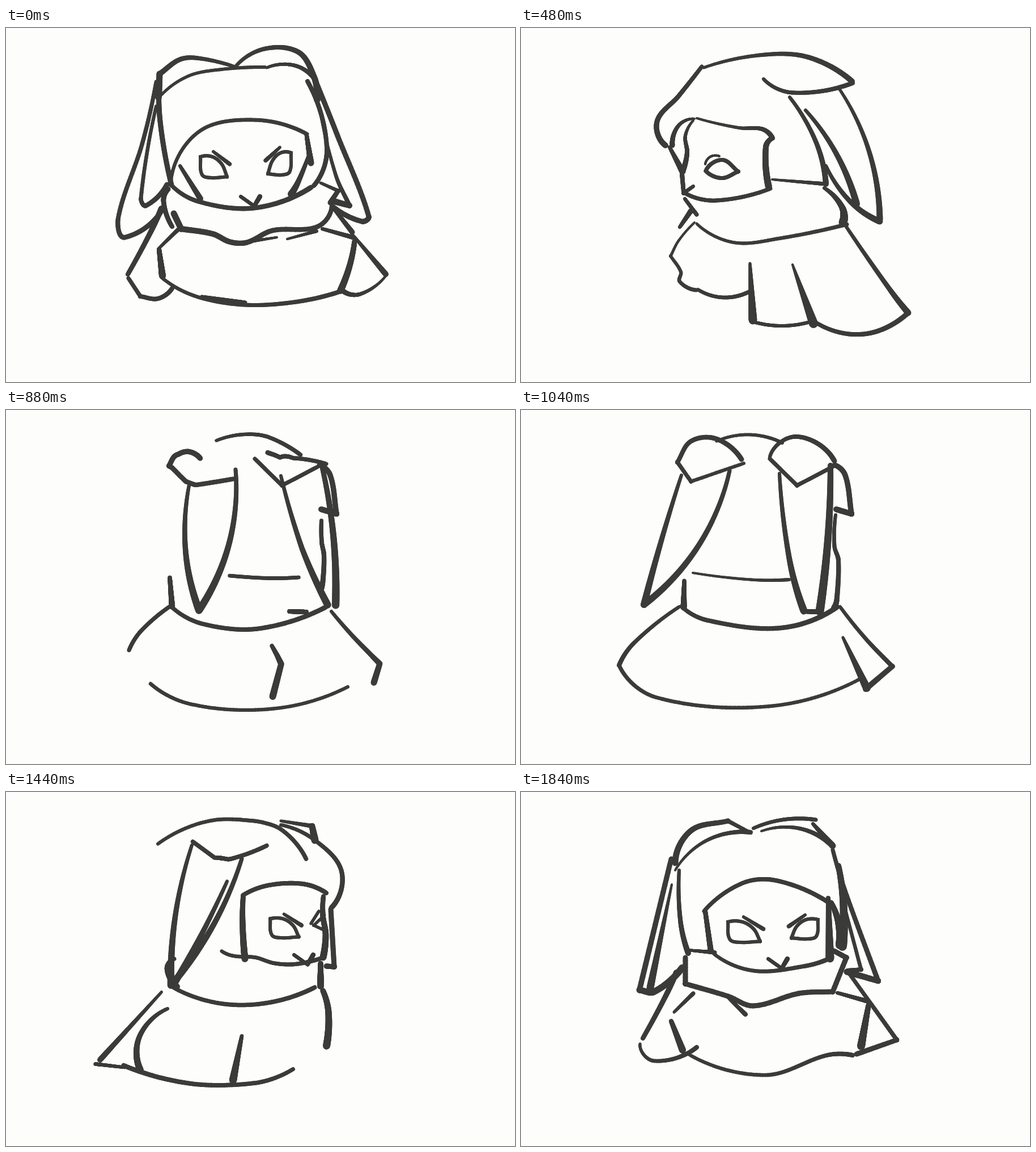
Write an HTML page with a canvas that moves like this. It is 898 px wide and 624 px high and loops after 1920 ms.

```html
<!DOCTYPE html>
<html lang="en">
<head>
<meta charset="utf-8">
<title>Hooded rabbit turnaround</title>
<style>
html, body { margin: 0; width: 100%; height: 100%; overflow: hidden; background: #fdfdfc; }
canvas { display: block; }
</style>
</head>
<body>
<canvas id="stage" width="898" height="624"></canvas>
<script>
// A stroke reads "startWidth>endWidth x,y x,y ...": a smooth line whose pressure changes evenly.
// "!" marks a corner, "~n" bows the line by n pixels between its neighbours.
// Ears and eyes: a = the rabbit's left, b = its right. Equal names move into each other.
const STEP = 80, COUNT = 24, SAMPLES = 80;

function ear(side, base, otherBase, tip, bow, otherBow, weight = 12) {
  return {
    [side + 1]: `6>${weight} ${base} ~${bow} ${tip}`,
    [side + 2]: `7>${weight} ${otherBase} ~${otherBow} ${tip}`
  };
}

// A slanted eye with its lid, given by its outer and inner side.
function eye(side, outer, inner, top, bottom) {
  const at = (u, v) => `${outer + (inner - outer) * u},${top + (bottom - top) * v}`;
  return {
    ["eye" + side]: `6>6 ${at(0, 0)}! ${at(0.06, 0.85)} ${at(0.4, 1)} ${at(1, 0.95)}! ${at(0.8, 0.35)} ${at(0.45, 0)} ${at(0, 0)}`,
    ["lid" + side]: `5>7 ${at(0.48, -0.25)} ${at(1.1, 0.35)}`
  };
}

function mouth(x, y) {
  return {
    mouthL: `6>6 ${x - 24},${y - 17} ${x},${y}`,
    mouthR: `8>7 ${x + 10},${y - 17} ${x},${y}`
  };
}

const front = {
  ...eye("B", 343, 390, 227, 264),
  ...eye("A", 503, 462, 220, 259),
  ...mouth(438, 314),
  topB: "12>6 269,122 271,81! 308,55 345,54 408,70",
  browB: "5>6 274,118 ~12 380,73 457,69",
  top: "6>12 405,68 455,37 515,42 543,85 549,126",
  browA: "5>8 460,70 509,66 545,91",
  b1: "7>9 265,95 240,205 198,335 210,369 278,316",
  b2: "6>9 265,138 238,300 247,313 284,276",
  headL: "9>9 271,90 272,165 292,277",
  a2: "9>9 549,100 585,190 640,332 628,341 578,316",
  a1: "5>11 555,150 582,260 606,313! 577,305",
  headR: "8>8 532,94 566,210 543,278",
  face: "6>7 291,270 340,183 438,162 531,187",
  faceR: "7>11 530,187 538,238",
  flapR: "6>12 535,222 516,270 503,293",
  faceL: "6>10 307,243 343,301",
  jaw: "7>9 290,275 340,306 440,317 538,281",
  scarfL: "9>8 286,284 278,306 293,350",
  scarf: "11>8 296,327 309,354! 365,363 395,377 425,378 470,357 550,350 575,312",
  crease: "6>4 420,378 478,369",
  crease2: "4>6 496,372 548,358",
  scarfR: "5>9 555,273 586,287! 572,308",
  scarfR2: "6>9 578,318 611,360",
  chestL: "7>5 304,355 270,388",
  sideL: "8>12 270,390 276,437",
  hem: "6>8 276,441 335,473 420,488 510,483 588,465",
  hemL: "5>7 345,473 422,484",
  shoulderR: "6>8 558,354 612,369",
  sideR: "9>12 615,376 606,420 590,463",
  cape: "10>8 274,318 255,360 215,434",
  cuffL: "7>8 216,441 237,473! 268,477 293,459",
  back: "5>10 612,365 670,434",
  cuffR: "4>9 670,437 625,469 594,463"
};

const left = {
  ...ear("a", "502,145", "560,105", "592,310", 11, 0),
  a2: "5>11 560,105 ~18 633,338",
  top: "5>10 322,70 420,48 505,51 584,94",
  hood: "7>10 319,68 278,120 240,165 255,207",
  hood2: "6>11 262,210 285,253",
  flap: "9>4 267,207 278,172 306,160",
  faceL: "4>10 304,163 290,190 293,220 285,253",
  face: "4>9 310,159 385,176 425,178 443,193",
  faceR: "8>12 444,194 432,210 437,280",
  nose: "8>6 284,257 287,291! 304,279",
  jaw: "7>7 291,292 345,304 440,283",
  neck: "4>7 443,267 538,275",
  eyeA: "7>7 326,252 ~20 383,253! ~12 326,252",
  lidA: "4>4 325,240 ~7 350,226",
  foldA: "6>8 428,90 480,114 585,97",
  earEdge: "11>6 633,341 580,305 538,243",
  headR: "6>10 474,122 520,200 538,275",
  scarfR: "6>15 535,282 566,315 568,343",
  scarfL: "6>7 289,301 310,329",
  scarfL2: "9>6 300,322 280,351",
  scarf: "5>7 310,345 375,378 455,371 575,346",
  chestL: "4>7 306,343 278,375 264,402! 282,430 280,447 309,462",
  hemL: "6>7 312,461 ~-12 402,465",
  p1: "5>15 404,415 409,515",
  p2: "4>16 479,417 516,521",
  cuffL: "6>6 410,518 ~-7 510,518",
  hem: "7>9 520,519 575,539 630,534 683,502",
  back: "6>11 573,349 650,460 683,502"
};

const leftBack = {
  ...ear("a", "365,140", "442,103", "464,363", -32, 21, 14),
  ...ear("b", "514,120", "570,105", "636,333", -4, 11),
  topB: "7>6 298,80 325,65 403,54",
  top: "6>9 397,53 450,42 500,49 578,100",
  foldA: "10>10 296,83 299,105! 340,128 409,149",
  foldA2: "14>5 409,149 440,100 462,88",
  knot: "9>8 469,80 473,75",
  foldB: "10>5 484,67 500,116! 577,100",
  hood: "7>12 292,95 ~-8 268,203",
  face: "6>14 287,175 320,160 350,195 348,297",
  jaw: "7>8 352,299 300,295 277,248! 285,180",
  eyeA: "9>9 295,231 294,248",
  tuft: "5>14 525,120 575,200 620,305",
  neckL: "5>7 355,304 390,310",
  neck: "9>7 486,297 560,291",
  headR: "8>9 558,205 ~4 558,290",
  scarfR: "8>11 561,290 569,346",
  scarfL: "8>10 290,290 299,345",
  scarf: "7>8 298,345 360,382 430,387 570,348",
  cape: "8>6 297,347 ~-4 261,397",
  chestL: "9>9 260,400 275,465",
  p1: "8>6 273,480 326,402",
  p2: "9>10 370,430 375,435! 331,520",
  cuffL: "4>7 267,489 325,512",
  hem: "6>6 337,515 475,534 606,503",
  cuffR: "5>7 588,519 ~-10 673,463",
  back: "6>12 585,363 690,469"
};

const rear = {
  ...ear("a", "283,115", "368,107", "217,343", -2, 25),
  b1: "6>13 456,112 473,260 499,354",
  b2: "10>15 546,98 ~5 527,355",
  tip: "8>8 500,355 530,356",
  top: "5>6 345,55 ~13 461,58",
  foldA: "9>6 389,87 345,51 300,55 276,92! 300,126! 393,94",
  foldB: "6>9 439,83 487,47 553,90",
  foldB2: "7>7 439,86 487,133! 550,100",
  flap: "9>10 553,97 572,115 583,183! 556,175",
  headR: "6>10 555,185 553,240 560,265 557,335 552,349",
  neck: "4>6 303,287 405,299 473,299",
  scarfL: "7>11 288,301 287,348",
  scarf: "7>9 283,346 330,371 460,384 558,347",
  cape: "6>8 279,347 200,410 173,450",
  hem: "7>6 173,450 240,507 440,522 600,473",
  back: "6>10 563,347 608,403 655,452! 608,492",
  p2: "5>14 568,401 610,490"
};

const rightBack = {
  ...ear("a", "264,98", "312,107", "224,316", -7, 24),
  ...ear("b", "380,85", "460,130", "358,347", -20, 17),
  ...eye("B", 498, 546, 227, 254),
  top: "6>9 263,86 365,48 480,55 550,85 574,185",
  flap: "9>7 574,182 586,187! 572,203",
  foldA: "6>6 263,93 300,100 385,77",
  foldA2: "4>5 298,104 384,81",
  foldB: "9>6 386,78 391,128! 430,132 527,101",
  tuftA: "5>10 300,140 228,305",
  tuft: "6>7 452,135 ~6 362,343",
  headL: "10>8 268,260 270,338",
  face: "8>9 455,181 520,162 575,185",
  faceL: "9>11 456,183 464,290",
  faceR: "8>10 563,193 558,220 565,250 553,291",
  jaw: "6>7 464,293 553,291",
  chin: "6>10 553,291 557,308 537,338",
  scarf: "6>9 280,343 420,377 537,339",
  shoulderR: "4>7 546,339 570,348",
  sideR: "11>14 567,350 575,437",
  cuffR: "7>9 571,441 547,487",
  p1: "6>15 465,430 459,518",
  p2: "5>12 508,408 537,492",
  cape: "4>9 268,353 155,481",
  cuffL: "7>5 155,482 185,483",
  hem: "10>7 172,465 290,523 410,532 460,519",
  hem2: "6>8 468,516 ~-7 537,490"
};

const right = {
  ...ear("b", "276,102", "372,105", "224,334", -1, 10, 13),
  ...eye("B", 434, 487, 220, 260),
  ...mouth(532, 304),
  eyeA: "5>5 562,217 543,235! 560,243",
  lidA: "5>5 552,210 538,232",
  top: "6>6 273,97 340,52 390,42 485,51",
  fin: "5>13 485,51 540,60! 545,85",
  hood: "6>9 485,58 545,85 592,140 574,204",
  foldB: "6>9 273,97 368,105! 393,88",
  tuft: "6>17 328,180 283,250 232,332",
  face: "7>7 381,183 430,165 510,159 555,171",
  faceL: "8>13 381,183 375,230 379,298",
  faceR: "8>14 557,175 566,292",
  flapR: "9>9 573,207 579,308! 565,307",
  jaw: "6>8 297,268 320,285 380,291 430,312 490,315 567,292",
  scarfL: "7>10 297,294 284,312 302,343",
  scarf: "8>7 310,346 410,374 552,350",
  scarfR: "9>12 555,302 555,342",
  sideR: "8>12 551,350 567,385 556,458",
  cape: "6>11 281,352 177,463",
  cuffL: "6>6 160,477 235,488",
  sideL: "6>12 285,382 236,430 237,490",
  p1: "7>12 367,430 342,498",
  hem: "7>7 243,499 440,501 553,458"
};

const { cape, chestL, shoulderR } = front;
const almostFront = {
  cape, chestL, shoulderR,
  ...eye("B", 365, 422, 229, 265),
  ...eye("A", 524, 477, 225, 259),
  ...mouth(460, 311),
  topB: "11>6 272,125 300,68 365,51! 405,72",
  browB: "4>8 272,138 ~22 405,71",
  top: "6>7 410,64 ~8 520,49",
  browA: "4>9 424,69 490,64 547,93",
  foldA: "6>11 515,56 550,95",
  b1: "9>12 265,118 209,349! 235,352 284,310",
  b2: "4>13 266,163 228,345",
  headL: "6>10 279,138 281,225 295,284",
  a2: "7>11 550,102 572,175 630,333! 575,317",
  a1: "6>8 570,200 600,313! 576,315",
  headR: "10>16 560,130 569,200 567,272",
  flapR: "9>14 547,195 560,230 562,270",
  face: "7>8 323,210 390,161 450,156 540,193",
  faceL: "8>10 325,210 335,281",
  faceR: "8>15 542,187 545,293",
  collar: "5>7 298,279 342,283",
  jaw: "6>8 340,285 410,315 500,307 545,293",
  scarf: "9>9 290,292 290,338! 365,360 410,377 490,355 550,352! 574,292! 552,280",
  crease: "5>8 365,362 396,392",
  sideL: "8>12 265,404 285,455",
  cuffL: "5>8 210,444 235,474 310,450",
  hem: "6>8 297,463 430,499 540,464 585,464",
  sideR: "9>14 613,376 600,448",
  back: "7>9 577,317 663,437! 592,462"
};

const mix = (a, b, t) => a + (b - a) * t;

function unit(p, q) {
  const dx = q[0] - p[0], dy = q[1] - p[1], d = Math.hypot(dx, dy) || 1;
  return [dx / d, dy / d];
}

function parse(tokens) {
  const points = [];
  let bow = 0;
  for (const token of tokens) {
    if (token[0] === "~") { bow = Number(token.slice(1)); continue; }
    const point = token.split(",").map(parseFloat);
    if (bow) {
      const p = points[points.length - 1], [dx, dy] = unit(p, point);
      points.push([mix(p[0], point[0], 0.5) + dy * bow, mix(p[1], point[1], 0.5) - dx * bow]);
      bow = 0;
    }
    points.push(point);
    if (token.endsWith("!")) points.push(point);
  }
  return points;
}

// Reflecting the neighbour's heading makes the ends of a line continue its arc.
function reflect(heading, chord) {
  const d = 2 * (heading[0] * chord[0] + heading[1] * chord[1]);
  return [d * chord[0] - heading[0], d * chord[1] - heading[1]];
}

function sample(text) {
  const [pressure, ...tokens] = text.split(" ");
  const [thin, thick] = pressure.split(">").map(Number);
  const points = parse(tokens), last = points.length - 1;
  const heading = points.map((_, i) => unit(points[Math.max(0, i - 1)], points[Math.min(last, i + 1)]));
  heading[0] = reflect(heading[1], unit(points[0], points[1]));
  heading[last] = reflect(heading[last - 1], unit(points[last - 1], points[last]));
  return Array.from({ length: SAMPLES + 1 }, (_, k) => {
    const at = k / SAMPLES * last, i = Math.min(last - 1, Math.floor(at)), u = at - i;
    const p = points[i], q = points[i + 1], len = Math.hypot(q[0] - p[0], q[1] - p[1]);
    const s = u * u * (3 - 2 * u), m = u * (1 - u) * (1 - u) * len, n = u * u * (u - 1) * len;
    const axis = c => mix(p[c], q[c], s) + heading[i][c] * m + heading[i + 1][c] * n;
    return [axis(0), axis(1), mix(thin, thick, k / SAMPLES)];
  });
}

const prepare = pose => Object.fromEntries(
  Object.entries(pose).map(([name, text]) => [name, sample(text)]));

const keys = [[0, front], [6, left], [9, leftBack], [13, rear], [16, rightBack], [20, right], [23, almostFront]]
  .map(([at, pose]) => ({ at, pose: prepare(pose) }));
keys.push({ at: COUNT, pose: keys[0].pose });

const ctx = document.getElementById("stage").getContext("2d");

function drawStroke(points) {
  for (let i = 1; i < points.length; i++) {
    const [x0, y0, w0] = points[i - 1], [x1, y1, w1] = points[i];
    ctx.lineWidth = (w0 + w1) / 2;
    ctx.beginPath();
    ctx.moveTo(x0, y0);
    ctx.lineTo(x1, y1);
    ctx.stroke();
  }
}

function drawPose(index) {
  const k = keys.findIndex((_, i) => index < keys[i + 1].at);
  const from = keys[k], to = keys[k + 1];
  const t = (index - from.at) / (to.at - from.at);
  ctx.fillStyle = "#fdfdfc";
  ctx.fillRect(0, 0, 898, 624);
  ctx.strokeStyle = "#3b3b3a";
  ctx.lineCap = "round";
  for (const name of new Set([...Object.keys(from.pose), ...Object.keys(to.pose)])) {
    const a = from.pose[name], b = to.pose[name];
    if (a && b) drawStroke(a.map((p, i) => p.map((v, c) => mix(v, b[i][c], t))));
    else if (a ? t < 0.5 : t >= 0.5) drawStroke(a || b);
  }
}

let shown = -1;
function tick(now) {
  const index = Math.floor(now / STEP) % COUNT;
  if (index !== shown) drawPose(shown = index);
  requestAnimationFrame(tick);
}
drawPose(0);
requestAnimationFrame(tick);
</script>
</body>
</html>
```
